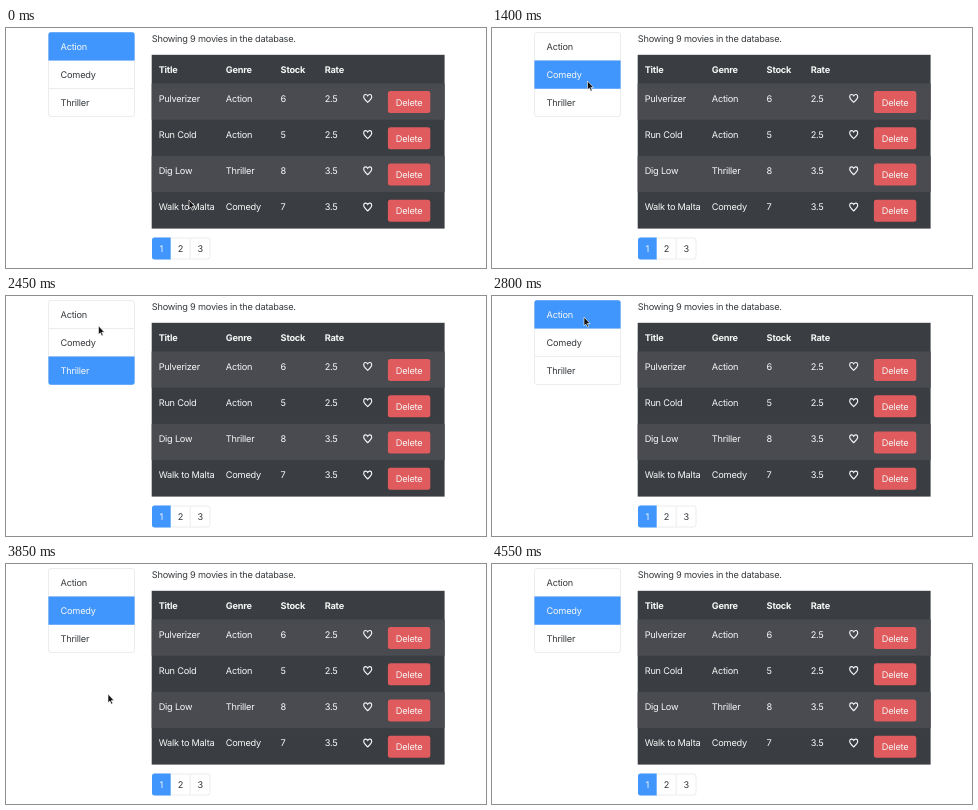
Recreate the animation shown at these times as an HTML page. Size 480 by 240 pixels, loop 4.76 s.

```html
<!DOCTYPE html>
<html lang="en">
<head>
<meta charset="utf-8">
<title>Movie list</title>
<style>
  html, body { margin: 0; width: 100%; height: 100%; overflow: hidden; background: #fff; }
  svg { display: block; width: 480px; height: 240px; }
  text {
    font: 400 9.2px Inter, "Liberation Sans", sans-serif;
    letter-spacing: -.22px;
    fill: #363a3e;
    text-rendering: geometricPrecision;
  }
  .light { fill: #f6f7f7; }
  .head { font-weight: 700; }
  .mid { text-anchor: middle; }
</style>
</head>
<body>
<svg id="stage" viewBox="0 0 480 240"></svg>
<script>
const LOOP = 4760, TICK = 70;
const BLUE = '#4096fd', LINE = '#ebecee', DARK = '#3a3e42', ROW = '#494b50', RED = '#df5b5d';
const stage = document.getElementById('stage');

function add(tag, attrs, parent = stage) {
  const el = document.createElementNS('http://www.w3.org/2000/svg', tag);
  for (const key in attrs) el.setAttribute(key, attrs[key]);
  parent.appendChild(el);
  return el;
}
const rect = (x, y, width, height, fill, more) => add('rect', { x, y, width, height, fill, ...more });
function label(x, y, str, cls = '') {
  const el = add('text', { x, y, class: cls });
  el.textContent = str;
  return el;
}

// Genre list
rect(42.5, 4.5, 86, 84, '#fff', { rx: 2.5, stroke: LINE });
for (const y of [32.5, 60.5]) add('path', { d: `M42.5 ${y}H128.5`, stroke: LINE });
const genres = ['Action', 'Comedy', 'Thriller'].map((name, i) => ({
  box: add('path', {
    d: [
      'M42.4 32.6V6.6Q42.4 4.2 44.8 4.2H126.2Q128.6 4.2 128.6 6.6V32.6Z',
      'M42.4 32.4H128.6V60.8H42.4Z',
      'M42.4 60.4H128.6V86.4Q128.6 88.8 126.2 88.8H44.8Q42.4 88.8 42.4 86.4Z'
    ][i],
    fill: BLUE
  }),
  text: label(54.6, 22 + 28 * i, name)
}));

// Table
const COLS = [152.7, 219.8, 274.6, 318.7];
label(145.8, 14.3, 'Showing 9 movies in the database.');
rect(145.7, 26.8, 292.9, 173.8, DARK);
['Title', 'Genre', 'Stock', 'Rate'].forEach((s, c) => label(COLS[c], 45, s, 'light head'));
[
  ['Pulverizer', 'Action', '6', '2.5'],
  ['Run Cold', 'Action', '5', '2.5'],
  ['Dig Low', 'Thriller', '8', '3.5'],
  ['Walk to Malta', 'Comedy', '7', '3.5']
].forEach((row, r) => {
  const y = 55.5 + 36.2 * r;
  if (r % 2 === 0) rect(145.7, y, 292.9, 36.2, ROW);
  row.forEach((s, c) => label(COLS[c], y + 18, s, 'light'));
  add('path', {
    d: 'M0 4C-1.4 2.7-4 .6-4-1.6C-4-4.3-1.1-4.5 0-2.5C1.1-4.5 4-4.3 4-1.6C4 .6 1.4 2.7 0 4Z',
    transform: `translate(361.7 ${y + 14.8})`,
    fill: 'none', stroke: '#f4f5f5', 'stroke-width': 1.15
  });
  rect(381.9, y + 7.6, 42.4, 22, RED, { rx: 2.5 });
  label(403.1, y + 22, 'Delete', 'light mid');
});

// Pages
rect(146.5, 210, 57.5, 21, '#fff', { rx: 2.5, stroke: LINE });
add('path', { d: 'M184.2 210V231', stroke: LINE });
add('path', { d: 'M164.7 209.5V231.5H148.5Q146 231.5 146 229V212Q146 209.5 148.5 209.5Z', fill: BLUE });
[155.2, 174.4, 194.3].forEach((x, i) => label(x, 224, i + 1, i ? 'mid' : 'mid light'));

// Pointer
const pointer = add('g', {});
const ring = add('circle', { r: 9.3, fill: 'none', stroke: '#33363a', 'stroke-width': 1.2 }, pointer);
const arrow = add('path', {
  d: 'M0 0V8.8L1.9 7.1L3.3 10.2L4.7 9.6L3.3 6.5H6Z',
  fill: '#111', stroke: '#fff', 'stroke-width': .6
}, pointer);
const beam = add('path', {
  d: 'M-1.8-4.2Q0-4.2 0-3Q0-4.2 1.8-4.2M0-3V3M-1.8 4.2Q0 4.2 0 3Q0 4.2 1.8 4.2M-1 1H1',
  fill: 'none', stroke: '#222', 'stroke-width': .9
}, pointer);

// [time, x, y] stops of the pointer, eased between
const PATH = [
  [0, 183, 172], [770, 100, 43], [1050, 100, 43], [1120, 97, 50], [1190, 97, 50],
  [1260, 95.5, 53], [1400, 95.5, 53], [1820, 95, 77], [2240, 95, 77],
  [2520, 92, 21], [2940, 92, 21], [3220, 88.5, 43.5], [3640, 88.5, 43.5],
  [3850, 102, 130], [4130, 112, 182], [4550, 122, 252], [LOOP, 122, 252]
];
// [time, selected genre]; each click ring comes just before
const PICKS = [[1400, 1], [1960, 2], [2800, 0], [3360, 1]];
const RING = 140;

function place(t) {
  const i = Math.max(1, PATH.findIndex(p => p[0] > t));
  const [a, b] = [PATH[i - 1], PATH[i]];
  const u = (t - a[0]) / (b[0] - a[0]);
  const e = t < 3640 ? u * u * (3 - 2 * u) : u;
  return [a[1] + (b[1] - a[1]) * e, a[2] + (b[2] - a[2]) * e];
}

const show = (el, on) => el.setAttribute('visibility', on ? 'visible' : 'hidden');

function draw(time) {
  const t = Math.floor((time % LOOP) / TICK) * TICK;
  const picked = PICKS.reduce((now, [at, id]) => t >= at ? id : now, 0);
  genres.forEach(({ box, text }, i) => {
    show(box, i === picked);
    text.setAttribute('class', i === picked ? 'light' : '');
  });
  const [x, y] = place(t);
  const overText = x < 90 && y > 38 && y < 56;
  pointer.setAttribute('transform', `translate(${x} ${y})`);
  show(ring, PICKS.some(([at]) => t >= at - RING && t < at));
  show(beam, overText);
  show(arrow, !overText);
}

const start = performance.now();
function loop() {
  draw(performance.now() - start);
  requestAnimationFrame(loop);
}
draw(0);
requestAnimationFrame(loop);
</script>
</body>
</html>
```
